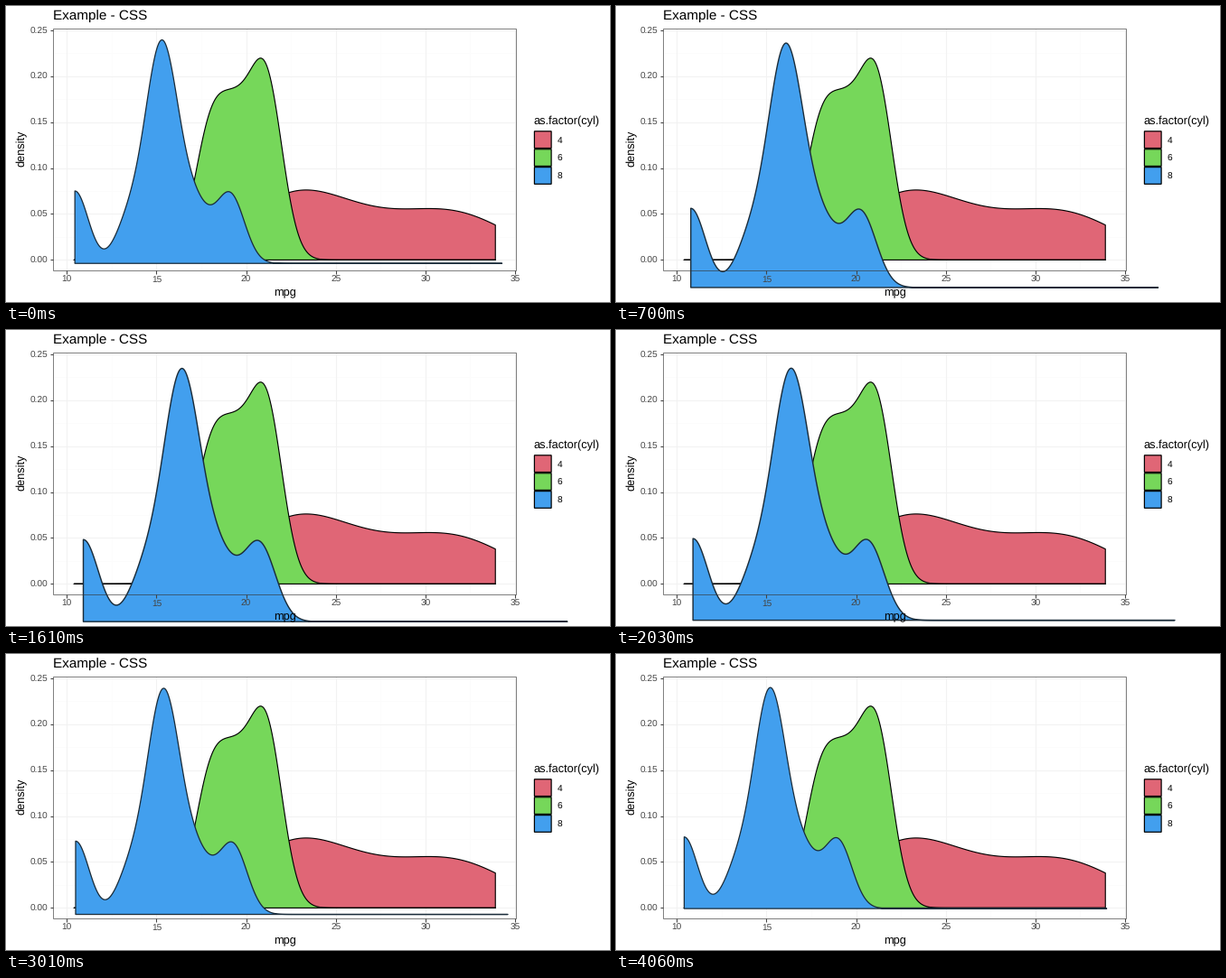
A matplotlib script for the animation above (4.13 s loop, 668 px wide and 328 px high).

```python
import numpy as np
import matplotlib.pyplot as plt
from matplotlib.animation import FuncAnimation
from matplotlib.patches import Polygon, Rectangle

W, H, DPI = 668, 328, 64
FRAMES, STEP = 59, 70
PX = 72 / DPI  # points per pixel

plt.rcParams["font.family"] = "Liberation Sans"
plt.rcParams["text.hinting"] = "none"

RED, GREEN, BLUE = "#e06676", "#76d75a", "#429fee"
LINE = 1.15

MPG = {
    4: [22.8, 24.4, 22.8, 32.4, 30.4, 33.9, 21.5, 27.3, 26.0, 30.4, 21.4],
    6: [21.0, 21.0, 21.4, 18.1, 19.2, 17.8, 19.7],
    8: [18.7, 14.3, 16.4, 17.3, 15.2, 10.4, 10.4, 14.7, 15.5, 15.2, 13.3,
        19.2, 15.8, 15.0],
}
LEFT, TOP, RIGHT, BOTTOM = 52, 25.3, 564.2, 293.3


def px(v):
    return 67.3 + 19.83 * (v - 10)


def py(d):
    return 281.4 - 1018 * d


def density_shape(values):
    """Gaussian kernel density as a closed pixel outline."""
    v = np.array(values)
    q1, q3 = np.percentile(v, [25, 75])
    bw = 0.9 * min(v.std(ddof=1), (q3 - q1) / 1.34) * len(v) ** -0.2
    x = np.linspace(10.4, 33.9, 512)
    z = (x[:, None] - v) / bw
    d = np.exp(-z ** 2 / 2).sum(axis=1) / (len(v) * bw * np.sqrt(2 * np.pi))
    top = np.column_stack([px(x), py(d)])
    return np.vstack([top, [px(33.9), py(0)], [px(10.4), py(0)]])


# Cubic easing curve (0.25, 0.1, 0.25, 1), sampled once
u = np.linspace(0, 1, 400)
EASE_X = 0.75 * u * (1 - u) ** 2 + 0.75 * u ** 2 * (1 - u) + u ** 3
EASE_Y = 0.3 * u * (1 - u) ** 2 + 3 * u ** 2 * (1 - u) + u ** 3

HALF, LEAD, GROWTH = 2100, 204, 0.15
ORIGIN = np.array([6.0, 0.0])


def scale_at(ms):
    turn, part = divmod((ms + LEAD) / HALF, 1)
    y = np.interp(part, EASE_X, EASE_Y)
    return 1 + GROWTH * (y if turn % 2 == 0 else 1 - y)


fig = plt.figure(figsize=(W / DPI, H / DPI), dpi=DPI, facecolor="white")
ax = fig.add_axes([0, 0, 1, 1])
ax.set_xlim(0, W)
ax.set_ylim(H, 0)
ax.axis("off")


def line(x, y, color, width, z):
    ax.plot(x, y, color=color, lw=width * PX, zorder=z,
            solid_capstyle="butt")


def label(x, y, text, size, color="black", **kw):
    ax.text(x, y, text, fontsize=size * PX, color=color, zorder=8,
            va="baseline", **kw)


def shape(points, color, z, edge="black"):
    return ax.add_patch(Polygon(points, closed=True, fc=color, ec=edge,
                                lw=LINE * PX, joinstyle="round", zorder=z))


# Grid, ticks and tick labels
for v in np.arange(12.5, 35, 5):
    line([px(v)] * 2, [TOP, BOTTOM], "#fcfcfc", 1, 1)
for d in np.arange(0.025, 0.25, 0.05):
    line([LEFT, RIGHT], [py(d)] * 2, "#fcfcfc", 1, 1)
for v in range(10, 36, 5):
    line([px(v)] * 2, [TOP, BOTTOM], "#f2f2f2", 1.1, 2)
    line([px(v)] * 2, [BOTTOM, BOTTOM + 3.2], "#444444", 1.1, 7)
    label(px(v), 306, str(v), 10.1, "#444444", ha="center")
for i in range(6):
    y = py(0.05 * i)
    line([LEFT, RIGHT], [y, y], "#f2f2f2", 1.1, 2)
    line([LEFT - 3.2, LEFT], [y, y], "#444444", 1.1, 7)
    label(46.4, y + 3.6, f"{0.05 * i:.2f}", 10.1, "#444444", ha="right")

# Densities
shape(density_shape(MPG[4]), RED, 3)
shape(density_shape(MPG[6]), GREEN, 4)
base = density_shape(MPG[8])
blue = shape(base, BLUE, 5, "#1a2c3a")

ax.add_patch(Rectangle((LEFT, TOP), RIGHT - LEFT, BOTTOM - TOP, fill=False,
                       ec="#333333", alpha=0.62, lw=PX, zorder=6))

# Titles and legend
label(51.5, 14.4, "Example - CSS", 15.2)
label(308.5, 320.5, "mpg", 12.7, ha="center")
label(20.5, 158, "density", 12.7, ha="center", rotation=90,
      rotation_mode="anchor")
label(583.5, 131, "as.factor(cyl)", 12.7)
for i, (name, color) in enumerate(zip("468", (RED, GREEN, BLUE))):
    y = 138.8 + 19.9 * i
    ax.add_patch(Rectangle((584.4, y), 18.7, 18.7, fc=color, ec="black",
                           lw=1.23 * PX, zorder=6, snap=False))
    label(609.5, y + 13, name, 10.1)


def draw(i):
    s = scale_at(i * STEP)
    blue.set_xy(ORIGIN + s * (base - ORIGIN))
    blue.set_linewidth(1.25 * s * PX)
    return (blue,)


anim = FuncAnimation(fig, draw, frames=FRAMES, interval=STEP, repeat=True,
                     repeat_delay=0, blit=False)
plt.show()
```
